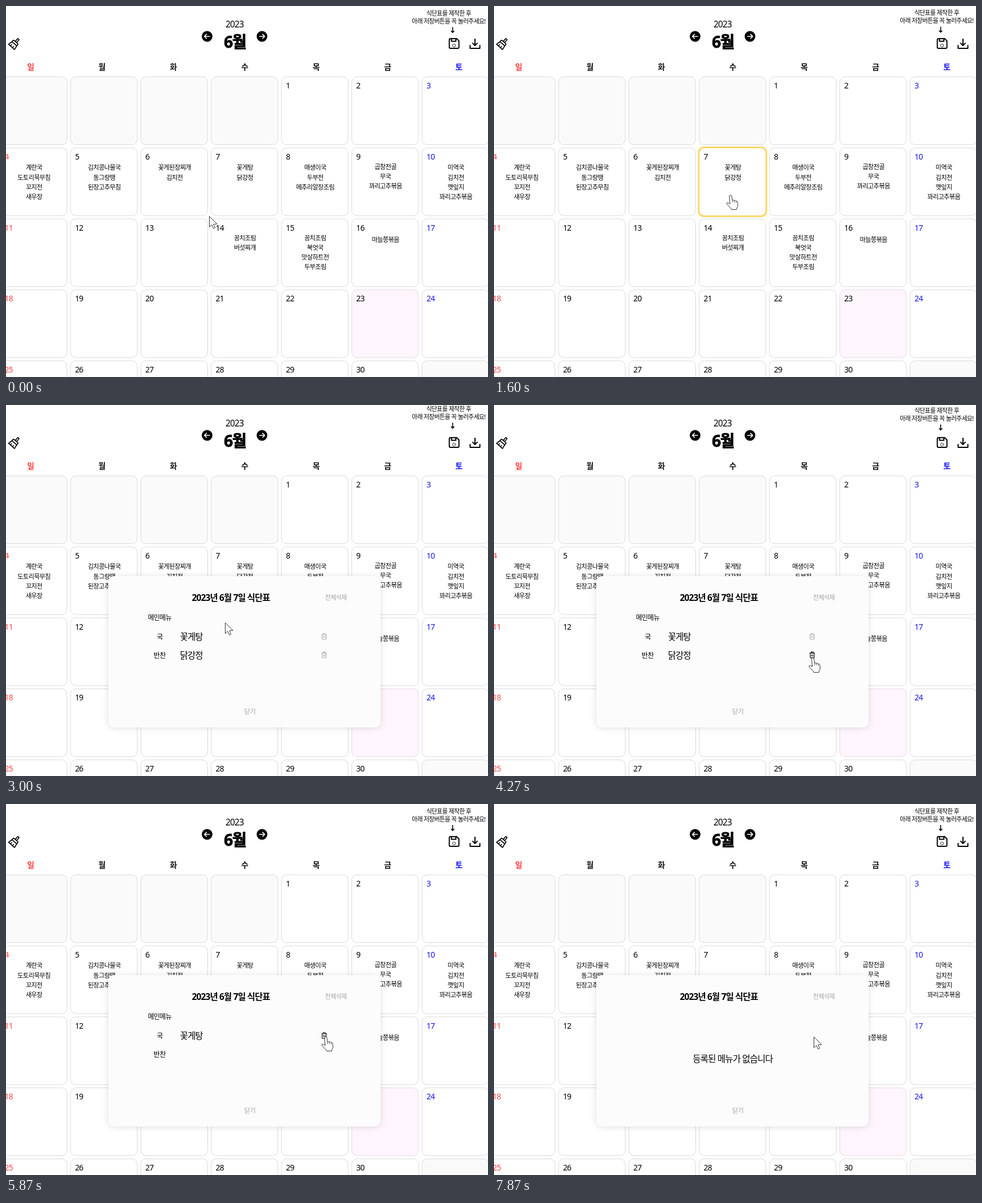
An HTML page with a canvas for the animation above (8 s loop, 852 by 657 pixels).

```html
<!DOCTYPE html>
<html lang="ko">
<head>
<meta charset="utf-8">
<title>식단표</title>
<style>
  html, body { margin: 0; width: 100%; height: 100%; overflow: hidden; background: #fff; }
  canvas { display: block; width: 852px; height: 657px; }
</style>
</head>
<body>
<canvas id="stage"></canvas>
<script>
const W = 852, H = 657, LOOP = 8000, STEP = 200 / 3;
const OPEN_AT = 2130, DELETE_SIDE = 4600, DELETE_SOUP = 6330;
const RED = '#ff4343', BLUE = '#1414f0', GRAY = '#a3a3a3';
const FONT = '"Noto Sans", "Noto Sans CJK KR", sans-serif';

const canvas = document.getElementById('stage');
const ctx = canvas.getContext('2d');
const dpr = window.devicePixelRatio || 1;
canvas.width = W * dpr;
canvas.height = H * dpr;

const grid = { x: -10.2, y: 125.5, dx: 124.28, dy: 125.72, w: 118, h: 120 };

// day: [first line offset inside the cell, dishes]
const menus = {
  4: [35, '계란국 도토리묵무침 꼬지전 새우장'],
  5: [35, '김치콩나물국 동그랑땡 된장고추무침'],
  6: [35, '꽃게된장찌개 김치전'],
  7: [35, '꽃게탕 닭강정'],
  8: [35, '매생이국 두부전 메추리알장조림'],
  9: [33.5, '곱창전골 무국 꽈리고추볶음'],
  10: [35, '미역국 김치전 깻잎지 꽈리고추볶음'],
  14: [33.5, '꽁치조림 버섯찌개'],
  15: [33.5, '꽁치조림 북엇국 맛살하트전 두부조림'],
  16: [36.7, '마늘쫑볶음']
};

// pointer tip: time, x, y
const track = [
  [0, 359, 372], [130, 359, 372], [800, 394, 349], [1500, 418, 335], [2250, 418, 335],
  [2900, 390.5, 382], [3130, 382, 390], [3470, 492, 408], [4100, 563.5, 448],
  [5130, 563.5, 448], [5700, 565, 412], [LOOP, 565, 412]
];

const arrowShape = new Path2D('M0 0V19L4.4 15L7.3 21.5L10.2 20.3L7.4 13.9L13.5 13.5Z');
const handShape = new Path2D('M-2 2Q-2 0 0 0Q2 0 2.3 2L3.2 9Q5 7.5 6.4 9.5Q8.5 8.5 9.7 10.5' +
  'Q12 10 12.6 12.5L13 18Q12.8 21 11 23L10.6 25.5L1.8 25.5Q.5 22.5 -2.5 20L-6.6 15.5' +
  'Q-7 12.8 -4.5 13.2L-.8 15.6Z');
const knuckles = new Path2D('M3.2 9L3.6 13M6.4 9.5L6.8 13.2M9.7 10.5L10 13.6');
const trashShape = new Path2D('M-4.6 -3.2H4.6M-1.8 -3.4V-5.2H1.8V-3.4M-3.6 -3V4.2Q-3.6 5.2 -2.6 5.2' +
  'H2.6Q3.6 5.2 3.6 4.2V-3M-1.2 -.8V2.8M1.2 -.8V2.8');
const floppyShape = new Path2D('M-8.4 -6.6Q-8.4 -8.6 -6.4 -8.6H4.6L8.6 -4.6V6.8Q8.6 8.6 6.8 8.6' +
  'H-6.6Q-8.4 8.6 -8.4 6.8ZM-4.6 -8.4V-3.8H3.2V-8.4');
const downloadShape = new Path2D('M0 -9V3M-4.6 -1.6L0 3L4.6 -1.6M-8.6 2V8H8.6V2');
const broomShape = new Path2D('M-1.6 -3V-9.4Q0 -11 1.6 -9.4V-3M-5.6 1.2V-1Q-5.6 -3 -3.6 -3H3.6' +
  'Q5.6 -3 5.6 -1V1.2ZM-5.6 1.2L-7 8.6H7L5.6 1.2M-2.6 8.4V5M2.2 8.4V5');
const thinArrow = new Path2D('M0 -5V4.6M-2.8 1.8L0 4.8L2.8 1.8');
const navArrow = new Path2D('M5 0H-4.6M-.6 -4.2L-4.8 0L-.6 4.2');

function text(str, x, y, size, { color = '#000', weight = 400, align = 'center' } = {}) {
  ctx.font = `${weight} ${size}px ${FONT}`;
  ctx.letterSpacing = `${-0.055 * size}px`;
  ctx.textAlign = align;
  ctx.fillStyle = color;
  ctx.fillText(str, x, y + size * 0.37);
}

function box(x, y, w, h, r, fill, stroke, width = 1) {
  ctx.beginPath();
  ctx.roundRect(x, y, w, h, r);
  if (fill) { ctx.fillStyle = fill; ctx.fill(); }
  if (stroke) { ctx.strokeStyle = stroke; ctx.lineWidth = width; ctx.stroke(); }
}

function shape(path, x, y, { stroke = '#000', width = 2, fill, angle = 0 } = {}) {
  ctx.save();
  ctx.translate(x, y);
  ctx.rotate(angle);
  ctx.lineJoin = 'round';
  if (fill) { ctx.fillStyle = fill; ctx.fill(path); }
  ctx.strokeStyle = stroke;
  ctx.lineWidth = width;
  ctx.stroke(path);
  ctx.restore();
}

// cubic-bezier(.25, .1, .25, 1)
function ease(p) {
  let lo = 0, hi = 1, u = p;
  for (let i = 0; i < 20; i++) {
    u = (lo + hi) / 2;
    const x = 0.75 * u * (1 - u) + u ** 3;
    if (x < p) lo = u; else hi = u;
  }
  return 0.3 * u * (1 - u) ** 2 + 3 * u * u * (1 - u) + u ** 3;
}

function pointerAt(t) {
  const i = Math.max(1, track.findIndex(k => k[0] > t));
  const [t0, x0, y0] = track[i - 1], [t1, x1, y1] = track[i];
  const p = (t - t0) / (t1 - t0), s = p * p * (3 - 2 * p);
  return { x: x0 + (x1 - x0) * s, y: y0 + (y1 - y0) * s };
}

function drawHeader(t) {
  text('2023', 404, 32, 15.5);
  text('6월', 404.5, 63.5, 28, { weight: 800 });
  ctx.strokeStyle = '#000';
  ctx.lineWidth = 0.8;
  ctx.strokeText('6월', 404.5, 63.5 + 28 * 0.37);
  for (const [x, angle] of [[355.5, 0], [452.5, Math.PI]]) {
    box(x - 9.5, 44.3, 19, 19, 9.5, '#000');
    shape(navArrow, x, 53.8, { stroke: '#fff', width: 1.6, angle });
  }
  shape(broomShape, 15.5, 66, { width: 1.7, angle: 0.72 });
  shape(floppyShape, 792, 66.3);
  ctx.beginPath();
  ctx.arc(792, 70, 2.6, 0, 7);
  ctx.stroke();
  shape(downloadShape, 829, 67);

  const phase = ((t + 10) % 2000) / 1000;
  const lift = 6 * (phase < 1 ? ease(phase) : 1 - ease(phase - 1));
  text('식단표를 제작한 후', 782.5, 13 - lift, 10.8);
  text('아래 저장버튼을 꼭 눌러주세요!', 782.5, 26.8 - lift, 10.8);
  shape(thinArrow, 789.5, 42.3 - lift, { width: 1.6 });

  [...'일월화수목금토'].forEach((name, i) => {
    const color = i === 0 ? RED : i === 6 ? BLUE : '#111';
    text(name, 43.2 + i * 126.2, 108, 14, { color, weight: 700 });
  });
}

function drawGrid(t, hover) {
  for (let i = 0; i < 35; i++) {
    const col = i % 7, day = i - 3;
    const x = grid.x + col * grid.dx, y = grid.y + Math.floor(i / 7) * grid.dy;
    const empty = day < 1 || day > 30;
    const fill = empty ? '#fafafa' : day === 23 ? '#fef5fd' : '#fff';
    box(x, y, grid.w, grid.h, 9, fill, day === 23 ? '#e6d9e4' : '#dadada');
    if (empty) continue;
    if (day === 7 && hover) box(x - 0.8, y - 0.8, grid.w + 1.6, grid.h + 2, 9.5, null, '#ffd65c', 2.8);
    const color = col === 0 ? RED : col === 6 ? BLUE : '#000';
    text(String(day), x + 7.8, y + 15.5, 14, { color, align: 'left' });
    if (!menus[day]) continue;
    const [top, list] = menus[day];
    let dishes = list.split(' ');
    if (day === 7) dishes = dishes.slice(0, t >= DELETE_SOUP ? 0 : t >= DELETE_SIDE ? 1 : 2);
    dishes.forEach((dish, n) => text(dish, x + 59.6, y + top + n * 17.2, 11.2, { weight: 500 }));
  }
}

function drawDialog(t, rows, overTrash) {
  ctx.save();
  ctx.shadowColor = 'rgba(0,0,0,.13)';
  ctx.shadowBlur = 12;
  ctx.shadowOffsetY = 1;
  box(181, 303, 481, 268, 9, '#fcfcfc');
  ctx.restore();
  text('2023년 6월 7일 식단표', 397.5, 341, 15.5, { weight: 700 });
  text('전체삭제', 583, 341, 11.1, { color: GRAY });
  text('닫기', 431, 542.5, 11.5, { color: GRAY });
  if (t >= DELETE_SOUP) {
    text('등록된 메뉴가 없습니다', 422, 451.5, 15.6, { weight: 500 });
    return;
  }
  text('메인메뉴', 271.5, 377, 12);
  text('국', 271.5, 410, 12.3);
  text('반찬', 271.5, 443, 12.3);
  for (const row of rows) {
    text(row.dish, 307.5, row.y + 0.5, 15.5, { align: 'left', weight: 500 });
    shape(trashShape, 562.5, row.y, { stroke: row === overTrash ? '#000' : '#adadad', width: 1.1 });
  }
}

function draw(t) {
  const p = pointerAt(t);
  const open = t >= OPEN_AT;
  const hover = !open && p.x > 362.5 && p.x < 481 && p.y > 251 && p.y < 371.5;
  const rows = [
    { dish: '꽃게탕', y: 410, until: DELETE_SOUP },
    { dish: '닭강정', y: 442.6, until: DELETE_SIDE }
  ].filter(row => t < row.until);
  const overTrash = open && rows.find(row => Math.abs(p.x - 562.5) < 8 && Math.abs(p.y - row.y) < 8);

  ctx.setTransform(dpr, 0, 0, dpr, 0, 0);
  ctx.fillStyle = '#fff';
  ctx.fillRect(0, 0, W, H);
  drawHeader(t);
  drawGrid(t, hover);
  if (open) drawDialog(t, rows, overTrash);

  const line = { stroke: '#333', width: 1, fill: '#fff' };
  if (hover || overTrash) {
    shape(handShape, p.x, p.y, line);
    shape(knuckles, p.x, p.y, { stroke: '#333', width: 0.8 });
  } else {
    shape(arrowShape, p.x + 0.5, p.y + 0.5, line);
  }
}

const start = performance.now();
function frame() {
  const t = (performance.now() - start) % LOOP;
  draw(Math.floor((t + 4) / STEP) * STEP);
  requestAnimationFrame(frame);
}
frame();
</script>
</body>
</html>
```
